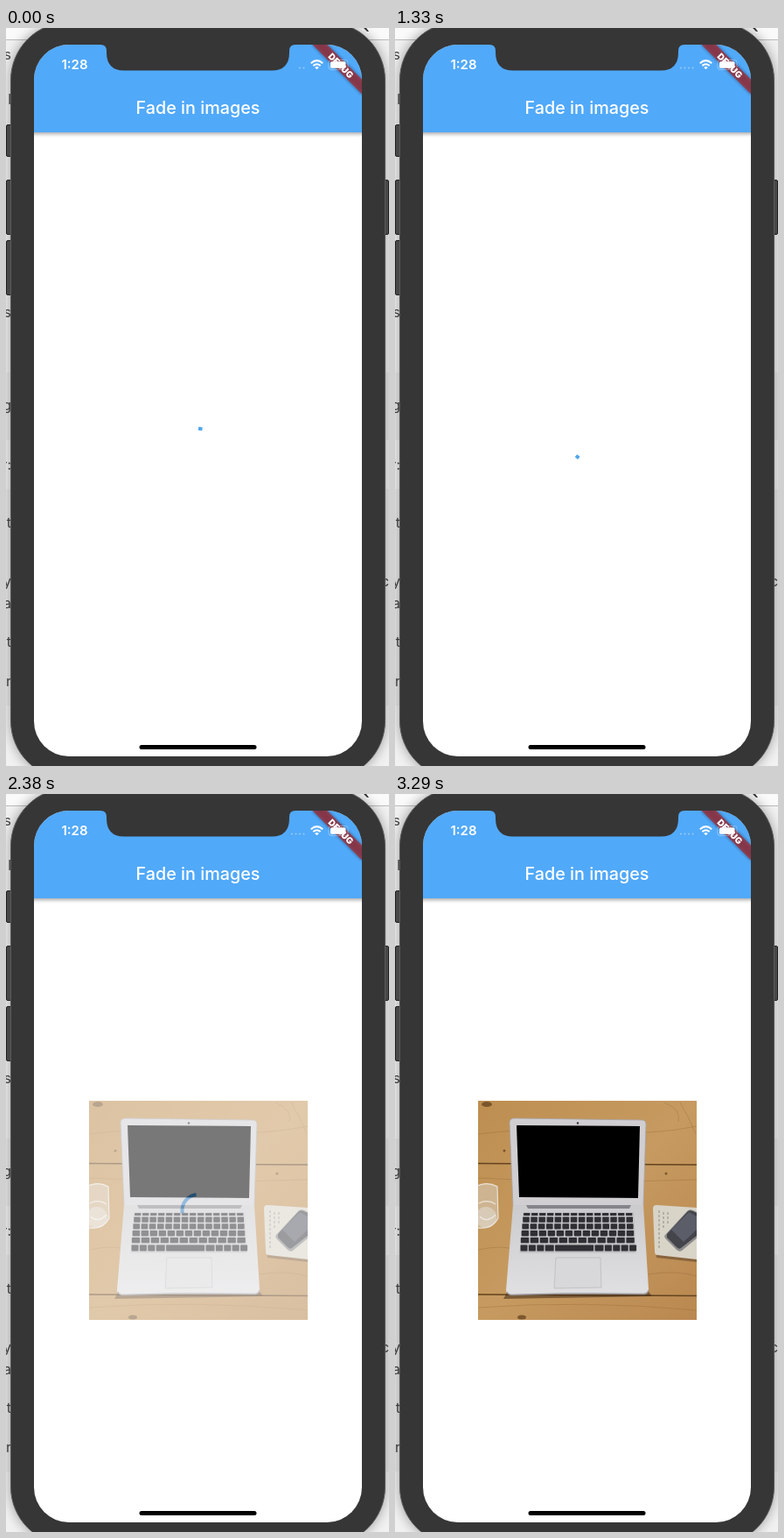
These frames come from a looping animation (438x842 px, 3.43 s). An HTML page:

```html
<!DOCTYPE html>
<html lang="en">
<head>
<meta charset="utf-8">
<title>Fade in images</title>
<style>
  html, body { margin: 0; width: 100%; height: 100%; overflow: hidden; background: #f1f1f1; }
  svg { display: block; width: 438px; height: 842px; }
  text { font-family: Inter, Roboto, sans-serif; }
  .page { fill: #444; font-size: 16px; }
  .bar { fill: #fff; text-anchor: middle; }
</style>
</head>
<body>
<svg viewBox="0 0 438 842">
  <defs>
    <clipPath id="screen"><rect x="32" y="19" width="375" height="812" rx="40"/></clipPath>
    <clipPath id="frame"><rect x="95" y="350" width="250" height="250"/></clipPath>
    <filter id="soft" x="-20%" y="-20%" width="140%" height="140%"><feGaussianBlur stdDeviation="2"/></filter>
    <filter id="halo" x="-10%" y="-10%" width="120%" height="120%"><feGaussianBlur stdDeviation="7"/></filter>
    <linearGradient id="wood" x1="0" y1="0" x2="1" y2="1">
      <stop offset="0" stop-color="#bd8e50"/>
      <stop offset=".5" stop-color="#c69a60"/>
      <stop offset="1" stop-color="#b98850"/>
    </linearGradient>
    <linearGradient id="base" x1="0" y1="0" x2="0" y2="1">
      <stop offset="0" stop-color="#cbcacc"/>
      <stop offset="1" stop-color="#e0dfe1"/>
    </linearGradient>
  </defs>

  <!-- page behind the phone -->
  <rect width="438" height="842" fill="#f1f1f1"/>
  <rect width="438" height="13" fill="#fafafa"/>
  <path d="M0 13.5H438" stroke="#bbb"/>
  <path d="M0 393H438V470H0ZM0 526H438V773H0Z" fill="#e9e9e9"/>
  <path d="M409 0h3l3 4h-2z" fill="#333"/>
  <g id="words" class="page"></g>

  <!-- phone body -->
  <rect x="5" y="-7" width="429" height="864" rx="66" fill="#000" opacity=".35" filter="url(#halo)"/>
  <g fill="#484848" stroke="#222">
    <rect x=".5" y="110.5" width="8" height="36" rx="1.5"/>
    <rect x=".5" y="173.5" width="8" height="62" rx="1.5"/>
    <rect x=".5" y="242.5" width="8" height="62" rx="1.5"/>
    <rect x="430" y="173.5" width="7.5" height="62" rx="1.5"/>
  </g>
  <rect x="5.5" y="-6.5" width="428" height="863" rx="66" fill="#363636" stroke="#5a5a5a"/>

  <g clip-path="url(#screen)">
    <rect x="32" y="19" width="375" height="812" fill="#fff"/>
    <rect x="28" y="19" width="383" height="102" opacity=".35" filter="url(#soft)"/>
    <rect x="32" y="19" width="375" height="100" fill="#51a9f9"/>
    <text class="bar" x="219.5" y="98" font-size="19.75" font-weight="500">Fade in images</text>

    <path id="arc" fill="none" stroke="#51a6ee" stroke-width="4" stroke-linecap="square"/>

    <g id="photo" clip-path="url(#frame)" opacity="0">
      <rect x="95" y="350" width="250" height="250" fill="url(#wood)"/>
      <g fill="none" stroke="#8b6232">
        <path d="M95 421.5L345 423M95 571L345 572.5" stroke="#63431f" stroke-width="1.6"/>
        <path d="M95 388q60-8 130-3t120-6M95 438q120 7 250 2M95 520q30-6 40 0M290 548q30-5 55 2M95 586q120-9 250 3M308 352q20 8 16 22M326 352q10 16 18 36" opacity=".3"/>
      </g>
      <g fill="#5f3d1d" opacity=".7">
        <ellipse cx="105" cy="354" rx="6" ry="3"/>
        <ellipse cx="145" cy="597" rx="5" ry="2.5"/>
        <circle cx="125" cy="407" r="1.5"/>
        <circle cx="310" cy="433" r="1.5"/>
      </g>

      <!-- glass -->
      <path d="M93 447q12-5 24 0l1 38q-8 14-25 10z" fill="#d9cfc0" opacity=".55"/>
      <ellipse cx="104" cy="483" rx="12" ry="12" fill="#e4e1dc" opacity=".5"/>
      <path d="M94 447q12-5 23 1l1 36q-7 13-23 11M96 467q10-5 19 1M97 482q8 8 18-2" fill="none" stroke="#f1eee9" stroke-width="1.2" opacity=".85"/>

      <!-- notebook and phone -->
      <path d="M296 474L345 477V534L299 529Z" fill="#65482c" opacity=".6"/>
      <path d="M299 469L345 472V531L300 526Q297 526 297 522L295 473Q295 469 299 469Z" fill="#d9d4c8"/>
      <path d="M302 475V520M307 477V496M312 477V490" stroke="#8d887f" stroke-width="1.3" stroke-dasharray="3 2" opacity=".7"/>
      <path d="M309 503L334 476Q337 473 341 475L345 477V507L328 521Q325 523 322 520L310 508Q307 505 309 503Z" fill="#8d8b8b"/>
      <path d="M311 502L335 476Q338 474 345 478V504L327 518Q325 520 322 517L311 506Z" fill="#44454b"/>
      <path d="M316 497L336 477L345 482V497L330 511Z" fill="#5b5e68"/>

      <!-- laptop -->
      <path d="M128 569L290 568L294 573L124 576Z" fill="#3e2916" opacity=".55"/>
      <path d="M137 370L282 372Q287 372 287 377L284 470H135L131 375Q131 370 137 370Z" fill="#d0ced1" stroke="#a7a4a6" stroke-width=".8"/>
      <path d="M139 378L280 379L278 461L142 460Z" fill="#000"/>
      <circle cx="209" cy="375.5" r="1.2" fill="#333"/>
      <path d="M135 469H284L290 565Q290 570 285 570L132 571Q127 571 127 566Z" fill="url(#base)"/>
      <path d="M150 469H270L268 473H152Z" fill="#84858b"/>
      <path d="M128 568Q129 571 133 571.5L193 570H224L285 570.5Q289 570 290 566" fill="none" stroke="#98969a" stroke-width="1.3"/>
      <path d="M184 529H235L236 563L182 564Z" fill="#d8d8da" stroke="#bcbbbe" stroke-width=".8"/>
      <path d="M146.500 477H273L275.500 523.500H142.500Z" fill="#bfbfc2"/>
      <g id="keys" fill="#303034"></g>
    </g>

    <!-- debug ribbon -->
    <g transform="translate(407 19) rotate(45)">
      <rect x="-40" y="28" width="80" height="12" opacity=".4" filter="url(#soft)"/>
      <rect x="-40" y="28" width="80" height="12" fill="#b71c1c" fill-opacity=".63"/>
      <text class="bar" x="0" y="37.700" font-size="10.2" font-weight="900">DEBUG</text>
    </g>

    <!-- status icons -->
    <text class="bar" x="78.500" y="47" font-size="15" font-weight="600">1:28</text>
    <g id="dots" fill="#fff" opacity=".4"></g>
    <g fill="none" stroke="#fff" stroke-width="2">
      <path d="M348.800 40.200Q355.500 34 362.200 40.200M351.300 43.100Q355.500 39.300 359.700 43.100"/>
    </g>
    <path d="M353.200 44.900Q355.500 43 357.800 44.900L355.500 47.300Z" fill="#fff"/>
    <rect x="369" y="36.500" width="22" height="11" rx="3" fill="none" stroke="#fff" opacity=".35"/>
    <rect x="371" y="38.300" width="17.500" height="7.500" rx="1.500" fill="#fff"/>

    <rect x="152.500" y="818" width="134" height="5" rx="2.500" fill="#000"/>
  </g>

  <!-- notch -->
  <path d="M108 17V19Q115 19 115 26V28Q115 48.500 135 48.500H304Q324 48.500 324 28V26Q324 19 331 19V17Z" fill="#363636"/>
</svg>

<script>
const LOOP = 3430, STEP = 70, SPIN = 1333;
const FADE_START = 1869, FADE_TIME = 750;
const CX = 219.5, CY = 475, R = 18;
const $ = id => document.getElementById(id);

function add(parent, tag, attrs, text) {
  const el = document.createElementNS('http://www.w3.org/2000/svg', tag);
  for (const k in attrs) el.setAttribute(k, attrs[k]);
  if (text) el.textContent = text;
  return parent.appendChild(el);
}

// Words cut off by the phone's left edge, by baseline.
[['s', 36], ['l', 87], ['s', 330], ['g', 436], ['r:', 504], ['t', 570],
 ['ly', 637], ['a', 662], ['it', 706], ['r', 751]]
  .forEach(([s, y]) => add($('words'), 'text', { x: 6, y, 'text-anchor': 'end' }, s));
add($('words'), 'text', { x: 429, y: 637 }, 'cl');

const dots = [327, 331.5, 336, 340.5].map(cx => add($('dots'), 'circle', { cx, cy: 45.5, r: 1 }));

// Keyboard: each row spreads a little wider than the one above.
function key(x, y, w, h) {
  add($('keys'), 'rect', { x, y, width: w, height: h, rx: 0.8 });
}
const rows = [14, 14, 14, 13, 12];
rows.forEach((n, r) => {
  const y = r ? 474.7 + r * 7.8 : 478, h = r ? 6.3 : 3;
  const left = 147 - r * 0.8, pitch = (126 + r * 1.4) / n;
  for (let i = 0; i < n; i++) key(left + i * pitch, y, pitch - 1.6, h);
});
let x = 143.5;
for (const w of [8, 8, 8, 10, 44, 10, 8, 8, 8, 8]) {
  key(x, 514.5, w, 7);
  x += w + 1.4;
}

function bezier(x1, y1, x2, y2) {
  const at = (a, b, s) => 3 * (1 - s) * (1 - s) * s * a + 3 * (1 - s) * s * s * b + s * s * s;
  return p => {
    if (p <= 0) return 0;
    if (p >= 1) return 1;
    let lo = 0, hi = 1;
    for (let i = 0; i < 24; i++) {
      const mid = (lo + hi) / 2;
      if (at(x1, x2, mid) < p) lo = mid; else hi = mid;
    }
    return at(y1, y2, lo);
  };
}
const fastOutSlowIn = bezier(0.4, 0, 0.2, 1);
const easeIn = bezier(0.42, 0, 1, 1);

function drawSpinner(ms) {
  const turn = Math.floor(ms / SPIN), p = ms / SPIN - turn;
  const head = fastOutSlowIn(p * 2), tail = fastOutSlowIn(p * 2 - 1);
  const start = Math.PI * (-0.5 + tail * 1.5 + p * 1.7 - turn * 0.8);
  const sweep = Math.max((head - tail) * 1.5 * Math.PI, 0.02);
  const point = a => `${(CX + R * Math.cos(a)).toFixed(3)} ${(CY + R * Math.sin(a)).toFixed(3)}`;
  const large = sweep > Math.PI ? 1 : 0;
  $('arc').setAttribute('d', `M${point(start)}A${R} ${R} 0 ${large} 1 ${point(start + sweep)}`);
}

function draw(now) {
  const t = Math.floor((now % LOOP) / STEP) * STEP;
  drawSpinner(t < STEP ? 35 : 566 + (t - 490) * 0.916);
  $('photo').setAttribute('opacity', easeIn((t - FADE_START) / FADE_TIME));
  dots.forEach((d, i) => d.setAttribute('opacity', t < STEP && i < 2 ? 0 : 1));
}

let origin;
function tick(now) {
  origin ??= now;
  draw(now - origin);
  requestAnimationFrame(tick);
}
draw(0);
requestAnimationFrame(tick);
</script>
</body>
</html>
```
